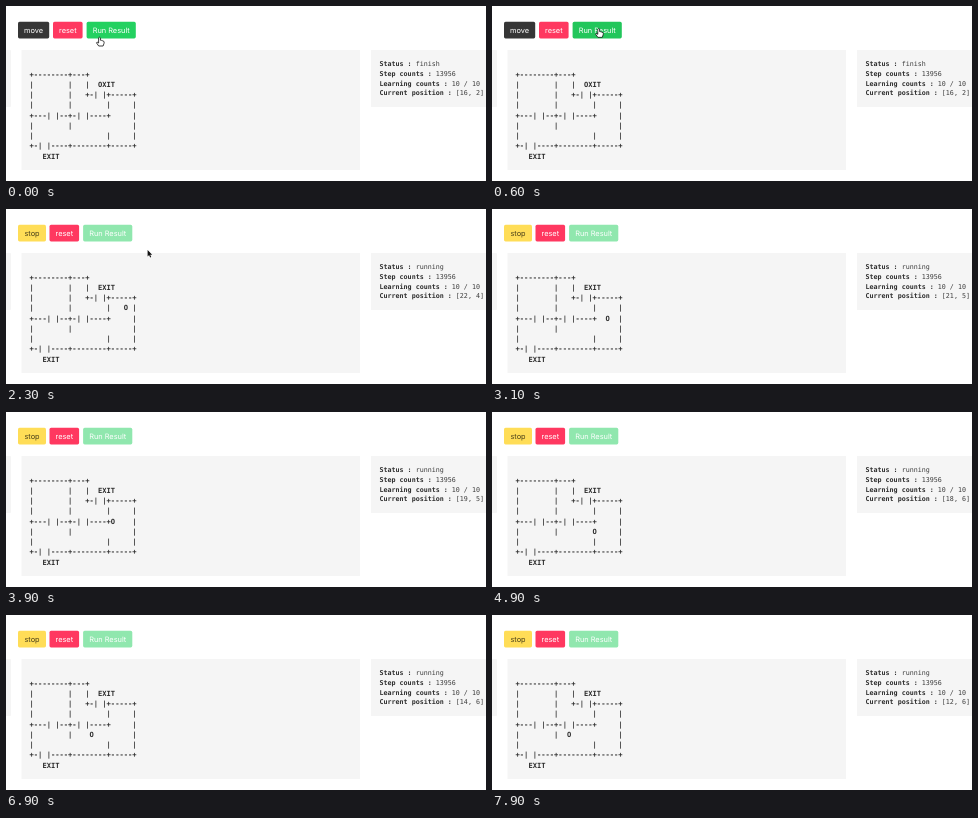
Recreate the animation shown at these times as an HTML page. Size 480 px wide and 175 px high, loop 8 s.

```html
<!DOCTYPE html>
<html lang="en">
<head>
<meta charset="utf-8">
<title>Maze run</title>
<style>
  html, body { margin: 0; width: 100%; height: 100%; overflow: hidden; background: #fff; }
  svg { display: block; width: 480px; height: 175px; }
  text { white-space: pre; text-rendering: geometricPrecision; }
  .mono { font-family: "DejaVu Sans Mono", "Liberation Mono", monospace; }
  .maze { font-size: 7.11px; font-weight: 700; fill: #2b2b2b; }
  .status { font-size: 6.68px; fill: #3c3c3c; }
  .label { font-weight: 700; fill: #2e2e2e; }
  .button { font: 7.4px Inter, Roboto, sans-serif; text-anchor: middle; }
</style>
</head>
<body>
<svg id="stage" viewBox="0 0 480 175" xmlns="http://www.w3.org/2000/svg">
  <g fill="#f5f5f5">
    <rect x="-5" y="44" width="10" height="57" rx="1"/>
    <rect x="15.5" y="44" width="338.5" height="120"/>
    <rect x="365" y="44" width="120" height="57"/>
  </g>
</svg>
<script>
const LOOP = 8000;
const RUN_AT = 1900;
const FIRST_MOVE = 2400;
const MOVE_EVERY = 500;

const MAZE = [
  "+--------+---+",
  "|        |   |  EXIT",
  "|        |   +-| |+-----+",
  "|        |        |     |",
  "+---| |--+-| |----+     |",
  "|        |              |",
  "|                 |     |",
  "+-| |----+--------+-----+",
  "   EXIT"
];

// Cursor tip: time, x, y
const CURSOR = [
  [0, 93.5, 31], [200, 100, 23], [400, 100, 23], [700, 110, 22],
  [1000, 110, 22], [1300, 118, 21], [1900, 118, 21], [2100, 136, 35],
  [2200, 136, 35], [2300, 141.6, 41], [2600, 165, 176]
];

const stage = document.getElementById("stage");

function add(parent, tag, attrs, content = "") {
  const node = document.createElementNS(stage.namespaceURI, tag);
  for (const key in attrs) node.setAttribute(key, attrs[key]);
  node.textContent = content;
  return parent.appendChild(node);
}

function makeButton(label, x, width, fill, ink = "#fff") {
  const group = add(stage, "g", {});
  const box = add(group, "rect", { x, y: 15.8, width, height: 16.6, rx: 1.6, fill });
  add(group, "text", { x: x + width / 2, y: 26.8, class: "button", fill: ink }, label);
  return { group, box };
}

const show = (node, visible) => node.setAttribute("display", visible ? "inline" : "none");

const move = makeButton("move", 12, 31.2, "#363636");
const stop = makeButton("stop", 12, 28, "#ffdd57", "rgba(0,0,0,.7)");
const reset = makeButton("reset", 47, 29.6, "#ff3860");
const run = makeButton("Run Result", 80.6, 49.2, "#23d160");

const mazeRows = MAZE.map((_, i) =>
  add(stage, "text", { x: 23.55, y: 70.6 + i * 10.25, class: "mono maze" }));

const values = ["Status", "Step counts", "Learning counts", "Current position"].map((label, i) => {
  const line = add(stage, "text", { x: 373.5, y: 60 + i * 9.8, class: "mono status" });
  add(line, "tspan", { class: "label" }, label + " : ");
  return add(line, "tspan", {});
});
values[1].textContent = "13956";
values[2].textContent = "10 / 10";

const hand = add(stage, "path", {
  d: "M-.9 .8Q0-.4 .9.8V3.2L2.1 3.4 3.2 3.8 4.3 4.3Q4.9 5 4.5 6.4L3.6 9H-.8L-3 5.9Q-2.7 4.6-1.7 5.4L-.9 6Z",
  fill: "#fff", stroke: "#111", "stroke-width": .8, "stroke-linejoin": "round"
});
const arrow = add(stage, "path", {
  d: "M0 0V6.4L1.5 5.1 2.5 7.4 3.6 6.9 2.6 4.7H4.6Z",
  fill: "#111", stroke: "#fff", "stroke-width": .5, "paint-order": "stroke"
});

function walkerAt(time) {
  if (time < RUN_AT) return [16, 2];
  const moves = Math.max(0, Math.floor((time - FIRST_MOVE) / MOVE_EVERY) + 1);
  if (moves === 0) return [22, 4];
  if (moves === 1) return [21, 4];
  // West along row 5, one step south, then west along row 6
  return moves < 5 ? [23 - moves, 5] : [24 - moves, 6];
}

function cursorAt(time) {
  const next = CURSOR.findIndex(key => key[0] > time);
  if (next < 0) return null;
  const [t0, x0, y0] = CURSOR[next - 1];
  const [t1, x1, y1] = CURSOR[next];
  const k = (time - t0) / (t1 - t0);
  return [x0 + (x1 - x0) * k, y0 + (y1 - y0) * k];
}

function drawButtons(time, running) {
  show(move.group, !running);
  show(stop.group, running);
  const shift = running ? "translate(-3.5 0)" : "";
  reset.group.setAttribute("transform", shift);
  run.group.setAttribute("transform", shift);
  run.group.setAttribute("opacity", running ? .5 : 1);
  const pressed = time >= 1700 && !running;
  const hovered = time >= 200 && !running;
  run.box.setAttribute("fill", pressed ? "#20bc56" : hovered ? "#22c65b" : "#23d160");
}

function drawMaze([col, row]) {
  MAZE.forEach((line, i) => {
    const padded = line.padEnd(25);
    mazeRows[i].textContent = i === row - 1
      ? padded.slice(0, col) + "O" + padded.slice(col + 1)
      : line;
  });
}

function drawCursor(time, running) {
  const tip = cursorAt(Math.floor(time / 100) * 100);
  show(hand, tip && !running);
  show(arrow, tip && running);
  if (tip) (running ? arrow : hand).setAttribute("transform", `translate(${tip})`);
}

function render(time) {
  const running = time >= RUN_AT;
  const walker = walkerAt(time);
  drawButtons(time, running);
  drawMaze(walker);
  drawCursor(time, running);
  values[0].textContent = running ? "running" : "finish";
  values[3].textContent = `[${walker.join(", ")}]`;
}

const start = performance.now();
function tick() {
  render((performance.now() - start) % LOOP);
  requestAnimationFrame(tick);
}
tick();
</script>
</body>
</html>
```
